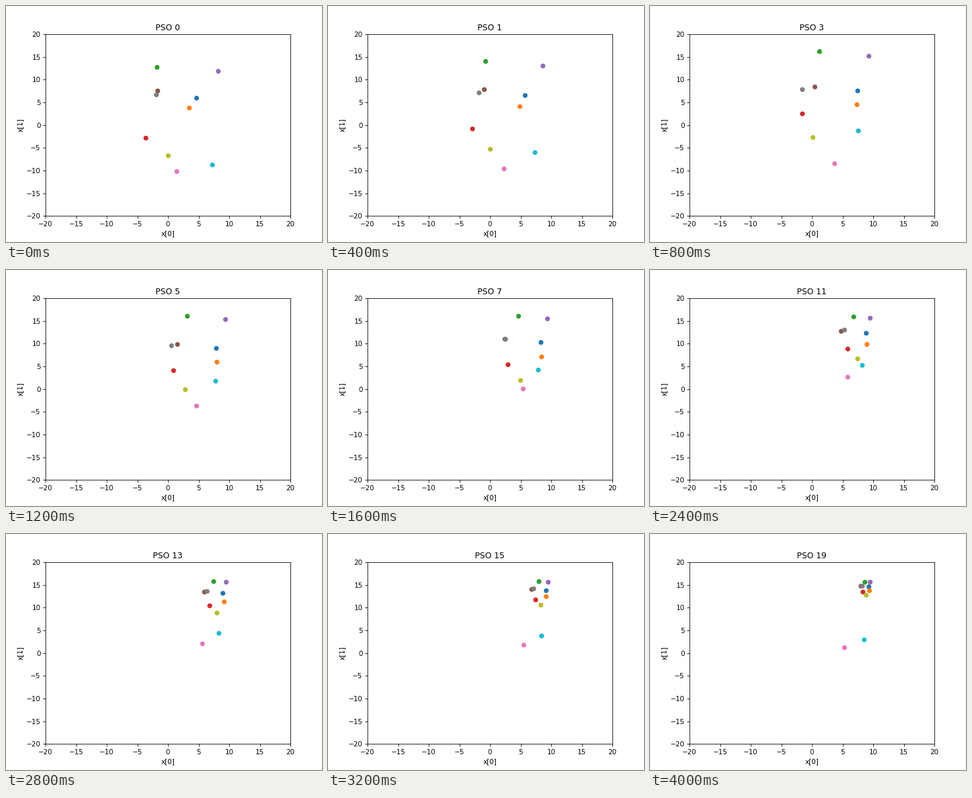
A matplotlib script that plays this animation: 480x360 px, repeating every 4200 ms.

```python
import numpy as np
import matplotlib.pyplot as plt
from matplotlib.animation import FuncAnimation

W, H, DPI = 480, 360, 75
STEP_MS = 200
STEPS = 20
TURN, SETTLE = 3, 9  # steps at which the swarm turns and starts to close in

# Per particle, in stage pixels: position at the start, at TURN and at SETTLE
SWARM = np.array([
    [(289, 140), (315, 129), (326, 103)],
    [(278, 155), (314, 150), (328, 126)],
    [(229, 93), (257, 69), (301, 71)],
    [(212, 201), (231, 164), (289, 136)],
    [(322, 99), (332, 76), (334, 73)],
    [(230, 129), (250, 123), (276, 99)],
    [(259, 252), (280, 240), (302, 159)],
    [(228, 135), (231, 127), (282, 97)],
    [(246, 228), (247, 200), (309, 156)],
    [(313, 242), (316, 190), (320, 138)],
])
LEADER = 4
# Two stragglers fall back to a place of their own
OWN_BEST = {6: (293, 177), 9: (327, 168)}


def slow(n):
    return 1 - np.exp(-np.asarray(n) / 10)


def position(k, n):
    """Travel along the waypoints, then close in exponentially on the aim."""
    way = SWARM[k]
    if n <= SETTLE:
        marks = slow([0, TURN, SETTLE])
        return np.array([np.interp(slow(n), marks, way[:, c]) for c in (0, 1)])
    aim = np.array(OWN_BEST.get(k, SWARM[LEADER, -1]))
    return aim + (way[-1] - aim) * np.exp(-(n - SETTLE) / 7)


def to_data(p):
    """Stage pixels to axis units: 372 x 277.2 px cover 40 x 40 units."""
    return (p[0] - 246) / 9.3, (181.8 - p[1]) / 6.93


fig, ax = plt.subplots(figsize=(W / DPI, H / DPI), dpi=DPI)
ax.set(xlim=(-20, 20), ylim=(-20, 20), xlabel="x[0]", ylabel="x[1]",
       xticks=range(-20, 21, 5), yticks=range(-20, 21, 5))
title = ax.set_title("PSO 0")
dots = [ax.scatter(0, 0, color=f"C{k}") for k in range(len(SWARM))]


def draw(frame):
    step = max(frame - 1, 0)  # the start is held for two ticks
    title.set_text(f"PSO {step}")
    for k, dot in enumerate(dots):
        dot.set_offsets([to_data(position(k, step))])
    return [title, *dots]


anim = FuncAnimation(fig, draw, frames=STEPS + 1, interval=STEP_MS,
                     init_func=lambda: draw(0), repeat=True)
plt.show()
```
